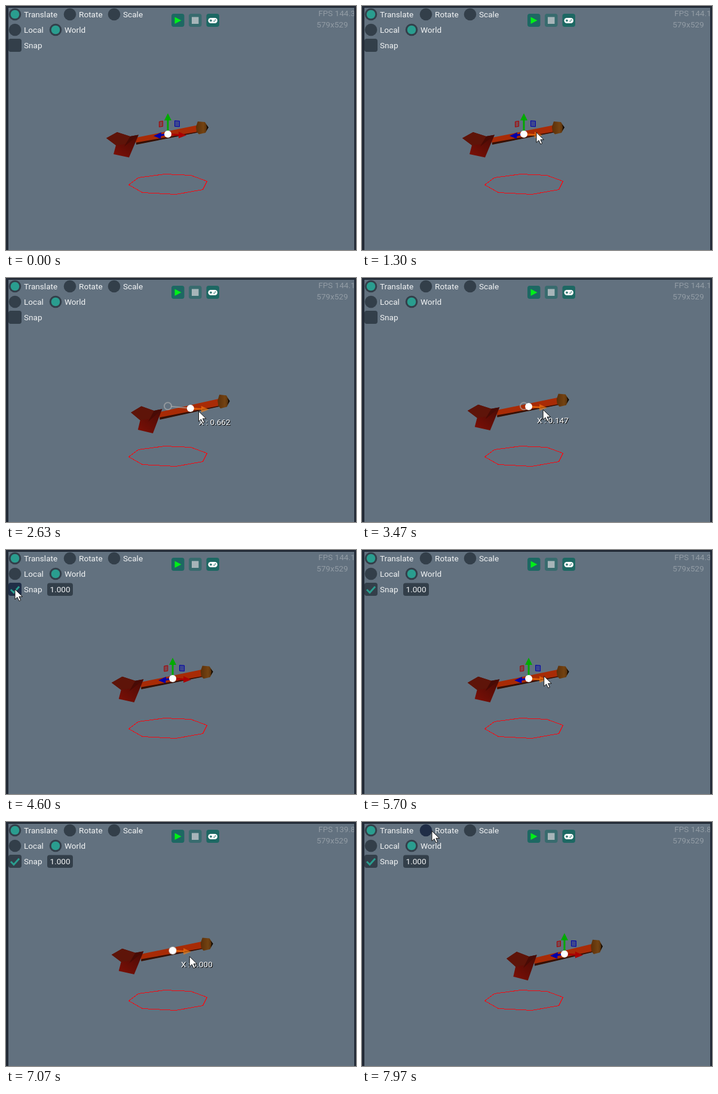
An HTML page that plays this animation: 586 by 410 pixels, repeating every 8 s.

```html
<!DOCTYPE html>
<html lang="en">
<head>
<meta charset="utf-8">
<title>Translate gizmo</title>
<style>
  html, body { margin: 0; width: 100%; height: 100%; overflow: hidden; background: #62717f; }
  svg { display: block; width: 586px; height: 410px; }
  text { font: 13.6px Roboto, Arial, sans-serif; fill: #f2f4f5; white-space: pre; }
  .stat { fill: #929ca5; }
  .well { fill: #333f4a; }
  .well.hot { fill: #202e47; }
  .on { fill: #2a9d8f; }
  .x { --c: #aa0000; }
  .y { --c: #00aa00; }
  .z { --c: #0000aa; }
  .x.hot { --c: rgba(255, 128, 16, .6); }
  .arrow line { stroke: var(--c); stroke-width: 3; }
  .arrow path { fill: var(--c); }
  .plane { fill: var(--c); fill-opacity: .38; stroke: var(--c); stroke-width: 1; }
  .trail { fill: none; stroke: rgba(171, 171, 171, .67); stroke-width: 2; }
</style>
</head>
<body>
<svg viewBox="0 0 586 410">
  <defs>
    <linearGradient id="fin" x1="0" y1="1" x2="1" y2="0">
      <stop offset=".2" stop-color="#780f06"/>
      <stop offset="1" stop-color="#430a05"/>
    </linearGradient>
    <linearGradient id="nose">
      <stop offset="0" stop-color="#5a2f09"/>
      <stop offset=".6" stop-color="#744312"/>
      <stop offset="1" stop-color="#4a2a0a"/>
    </linearGradient>
  </defs>

  <path d="M0 0H586V410H583V3H4V410H0Z" fill="#222a36"/>

  <path d="M205 300L221 288 265 282 309 284 336 294 329 308 284 316 228 313Z"
    transform="translate(.5 .5)" fill="none" stroke="#f80810" shape-rendering="crispEdges"/>

  <g id="rocket">
    <path d="M216 221.500L322 200 328 204V211L218 232.500Z" fill="#a82b06"/>
    <path d="M218 229.500L328 210V211.200L218 233Z" fill="#351004"/>
    <path d="M168 222L186 212 208 219 222 216.500 206 254.500 180 249 184 234Z" fill="url(#fin)"/>
    <path d="M168 222L186 212 209 219.500 200 232 184 234Z" fill="#5e1409"/>
    <path d="M208 219L222 216.500 198 236Z" fill="#480b05"/>
    <path d="M318 203L321 194 333 195 339 204 334 213 323 215.500 319 211Z" fill="url(#nose)"/>
    <path d="M335 199L339 204 335 210 336.500 204Z" fill="#0d0906"/>
  </g>

  <g id="trail" class="trail">
    <circle id="origin" r="6"/>
    <line id="path"/>
  </g>
  <g id="gizmo">
    <g id="axisX" class="arrow x"><line x2="19" y2="1.500"/><path d="M18 -4L31 2 18 7Z"/></g>
    <g id="others">
      <g class="arrow y"><line y2="-24"/><path d="M-6 -23H6L0 -35Z"/></g>
      <g class="arrow z"><line x2="-13" y2="2"/><path d="M-11 -3L-24 3 -12 8Z"/></g>
      <path id="planeX" class="plane x" d="M-14.500 -21L-8.500 -22V-13L-14.500 -12Z"/>
      <path class="plane z" d="M11.500 -22.500L19.500 -22V-12.500L11.500 -13Z"/>
    </g>
    <circle r="6" fill="#fff"/>
    <g id="tip">
      <text class="tipText" x="15" y="29" style="fill:#000"></text>
      <text class="tipText" x="14" y="28" style="fill:#fff"></text>
    </g>
  </g>

  <g id="radios"></g>
  <rect id="snapBox" class="well" x="4" y="55" width="22" height="22" rx="4"/>
  <text x="30" y="71">Snap</text>
  <g id="snapOn">
    <path d="M8 66.500L13 71.500 22 61.500" fill="none" stroke="#2a9d8f" stroke-width="3"/>
    <rect class="well" x="69" y="55.500" width="43" height="21.500" rx="4"/>
    <text x="73.500" y="71">1.000</text>
  </g>

  <g fill="#1d6863">
    <rect x="277" y="13" width="21.500" height="22" rx="4"/>
    <rect x="306" y="13" width="21.500" height="22" rx="4" opacity=".6"/>
    <rect x="335.500" y="13" width="21.500" height="22" rx="4"/>
  </g>
  <path d="M282.500 18.500L293.500 24.200 282.500 30Z" fill="#00f018"/>
  <rect x="311" y="18.500" width="11.500" height="11.500" fill="#a7b5b9"/>
  <rect x="338.500" y="20" width="15.500" height="9" rx="4.500" fill="#fff"/>
  <path d="M341 24.500H345M343 22.500V26.500M347.500 25.500H349.500M349.500 23.500H351.500" stroke="#1d6863" stroke-width="1.300"/>

  <svg width="583" height="50">
    <text id="fps" class="stat" x="523" y="16.500"></text>
    <text class="stat" x="520" y="36">579x529</text>
  </svg>

  <path id="cursor" d="M0 0V17L4 13.400 6.900 19.700 9.700 18.400 6.900 12.300H12.500Z" fill="#fff" stroke="#111" stroke-width="1"/>
</svg>

<script>
const LOOP = 8000;
const GRIP = 24;       // cursor's distance from the handle while dragging
const LOOK_AHEAD = 20; // the handle trails the cursor by this many ms

const $ = id => document.getElementById(id);
const show = (node, on) => node.style.display = on ? '' : 'none';
const place = (node, x, y) => node.setAttribute('transform', `translate(${x} ${y})`);

function addRadio(name, x, y, selected) {
  $('radios').innerHTML += `<circle id="${name}" class="well" cx="${x}" cy="${y}" r="10.300"/>` +
    (selected ? `<circle class="on" cx="${x}" cy="${y}" r="7.300"/>` : '') +
    `<text x="${x + 15}" y="${y + 5}">${name}</text>`;
}
addRadio('Translate', 15, 14, true);
addRadio('Rotate', 107, 14);
addRadio('Scale', 181, 14);
addRadio('Local', 15, 40);
addRadio('World', 83, 40, true);

// Keys are [time, ...values]; eased between neighbours
function sample(keys, t) {
  const next = keys.findIndex(key => key[0] > t);
  if (next < 0) return keys.at(-1).slice(1);
  if (next === 0) return keys[0].slice(1);
  const a = keys[next - 1], b = keys[next];
  const u = (t - a[0]) / (b[0] - a[0]);
  const s = u * u * (3 - 2 * u);
  return a.slice(1).map((v, i) => v + (b[i + 1] - v) * s);
}

const drags = [
  { start: 1700, end: 3580, from: 0, snap: v => v,
    hand: [[2046, 0], [2480, 1.35], [2500, 1.35], [2823, -0.56], [3350, 0.147]] },
  { start: 5880, end: 7500, from: 0.147, snap: Math.round,
    hand: [[5900, 0], [6480, -2], [6700, -2], [7320, 1]] }
];
const dragAt = t => drags.find(d => t >= d.start && t < d.end);
const handAt = (drag, t) => drag.from + sample(drag.hand, t)[0];

function offsetAt(t) {
  const drag = drags.findLast(d => t >= d.start);
  return drag ? drag.from + drag.snap(sample(drag.hand, t)[0]) : 0;
}

// Perspective of a move along the X axis
const depth = offset => offset / (1 - 0.07 * offset);
const project = offset => {
  const k = depth(offset);
  return [271 + 54.5 * k, 215.3 + 5.2 * k];
};

// Stops of the cursor: arrow, checkbox, arrow, Rotate; a drag sets its own x
const stops = [
  [30, 9, 298], [1000, 290, 212], [1700, 295, 213], [2200, 295, 216], [2600, 295, 224],
  [3580, 303, 221], [4250, 15, 66], [5030, 15, 66], [5600, 305, 212], [5880, 304, 212],
  [6480, 304, 226], [7500, 363, 226], [7950, 117, 15]
];

function cursorAt(t) {
  const [x, y] = sample(stops, t);
  const drag = dragAt(t);
  return [drag ? project(handAt(drag, t + LOOK_AHEAD))[0] + GRIP : x, y];
}

// Jitter around 144 with one short dip
function fpsAt(t) {
  const n = Math.floor(t / 500);
  return 144.3 + 0.3 * Math.sin(n * 2) - 4.6 * Math.exp(-((n - 14) ** 2) * 3);
}

function drawTrail(drag, offset, x, y) {
  const [ox, oy] = project(drag.from);
  const dx = x - ox, dy = y - oy, length = Math.hypot(dx, dy);
  const gap = length > 12 ? 5 / length : 0.5;
  const ends = { x1: ox + dx * gap, y1: oy + dy * gap, x2: x - dx * gap, y2: y - dy * gap };
  place($('origin'), ox, oy);
  Object.entries(ends).forEach(([name, value]) => $('path').setAttribute(name, value));
  const label = 'X : ' + (offset - drag.from).toFixed(3).replace('-0.000', '0.000');
  document.querySelectorAll('.tipText').forEach(node => node.textContent = label);
}

function draw(t) {
  const offset = offsetAt(t), k = depth(offset);
  const [x, y] = project(offset);
  const drag = dragAt(t);

  $('rocket').setAttribute('transform',
    `matrix(${1 - 0.047 * k} 0 0 ${1 + 0.105 * k} ${67.24 * k} ${-17.38 * k})`);
  place($('gizmo'), x, y);
  place($('planeX'), 1.6 * k, 0);
  show($('others'), !drag);
  show($('trail'), drag);
  show($('tip'), drag);
  if (drag) drawTrail(drag, offset, x, y);

  const [cx, cy] = cursorAt(t);
  const inside = (left, top, right, bottom) =>
    t >= 30 && cx >= left && cx <= right && cy >= top && cy <= bottom;
  place($('cursor'), cx, cy);
  show($('cursor'), t >= 30);
  $('axisX').classList.toggle('hot', Boolean(drag) || inside(x + 12, y - 8, x + 34, y + 10));
  $('Rotate').classList.toggle('hot', inside(97, 4, 165, 25));
  $('snapBox').classList.toggle('hot', inside(4, 55, 62, 77));
  show($('snapOn'), t >= 4480);
  $('fps').textContent = 'FPS ' + fpsAt(t).toFixed(1);
}

const began = performance.now();
function tick() {
  draw((performance.now() - began) % LOOP);
  requestAnimationFrame(tick);
}
tick();
</script>
</body>
</html>
```
